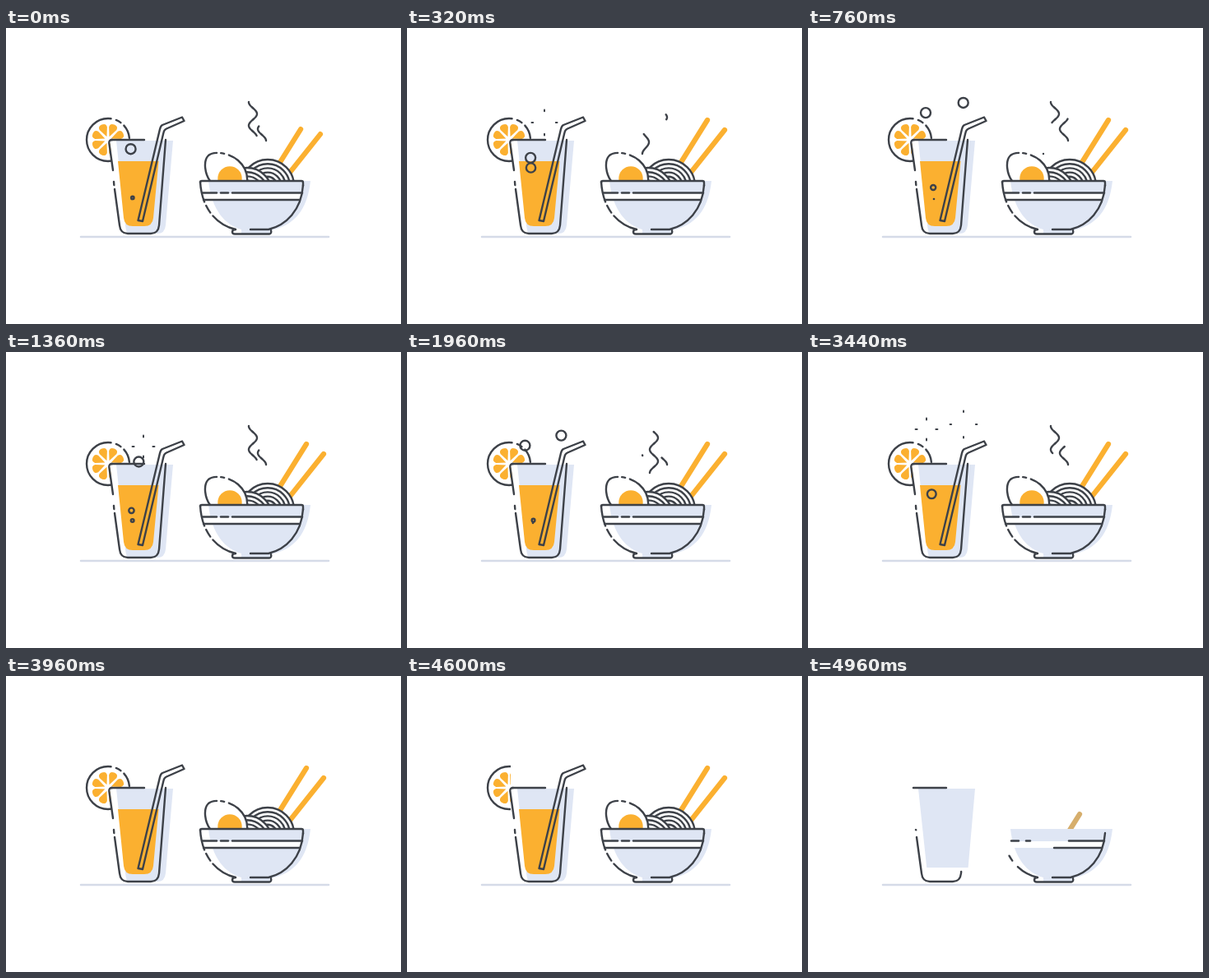
Recreate the animation shown at these times as an HTML page with a canvas. Size 480x360 px, loop 5000 ms.

```html
<!DOCTYPE html>
<html>
<head>
<meta charset="utf-8">
<style>
html, body { margin: 0; width: 100%; height: 100%; overflow: hidden; background: #fff; }
canvas { display: block; }
</style>
</head>
<body>
<canvas id="stage" width="480" height="360"></canvas>
<script>
const c = document.getElementById('stage').getContext('2d');
const INK = '#3d4148', ORANGE = '#fbb030', BLUE = '#dfe6f4', WHITE = '#fff';
const LOOP = 5000, STEP = 40, OUTRO = 4600;
const STEAM = { period: 680, rise: 285, lag: 250, wave: 14.2 };
const FIZZ = { period: 1270, speed: .152, x: 154, y: 208 };

const clamp = v => Math.max(0, Math.min(1, v));
const mix = (a, b, k) => a + (b - a) * k;
const smooth = v => { const k = clamp(v); return k * k * (3 - 2 * k); };

const path = d => new Path2D(d);
function fill(p, color) { c.fillStyle = color; c.fill(p); }
function stroke(p, width = 2.4, color = INK) {
  c.lineWidth = width; c.strokeStyle = color; c.stroke(p);
}
// Stroke only the stretch of a path between two lengths
function trim(p, from, to) {
  if (to <= from) return;
  c.setLineDash([to - from, 1e4]);
  c.lineDashOffset = -from;
  stroke(p);
  c.setLineDash([]);
}
function line(x1, y1, x2, y2, width, color) {
  stroke(path(`M${x1} ${y1}L${x2} ${y2}`), width, color);
}
function arc(x, y, r, from = 0, to = 2 * Math.PI) {
  const p = new Path2D();
  p.arc(x, y, r, from, to);
  return p;
}
function clipped(x, y, w, h, draw) {
  if (w <= 0 || h <= 0) return;
  c.save();
  c.beginPath(); c.rect(x, y, w, h); c.clip();
  draw();
  c.restore();
}

const glass = path('M126 136H194L186 240Q185 250 176 250H148Q139 250 138 240Z');
const glassShade = path('M134 137H203L194 240Q193 250 184 250H148Q146 248 145 240Z');
const juice = path('M136 162H185.5L179 231Q178 241 168 241H154Q144 241 143 231Z');
const glassCorner = path('M129 136Q125 136 125.3 140L130 173');
const glassBody = path('M132 196L138 240Q139 250 148 250H176Q185 250 186 240L194 136');
const straw = path('M160.5 234L187 123Q188 119 190 118L214 108.5L216.5 113L195 122.5Q192 124 191.5 127L166 235Z');
const wedge = path('M0 -4L-5 -15Q-5.5 -20 0 -20Q5.5 -20 5 -15Z');
const egg = path('M248 186C242 178 239 162 246 155C253 149 272 152 282 161C290 168 294 176 293 187');
const bowl = path('M236 186H361C360 222 340 240 319 245H279C258 240 238 222 236 186Z');
const bowlShade = path('M246 186H370C366 222 350 240 322 246V250H286V245C267 240 250 222 246 186Z');
const bowlLeft = path('M236 187C238 222 258 240 279 245');
const bowlRight = path('M361 191C359 222 340 240 319 245H297');
const bowlBase = path('M279 245Q275 245 275 248Q275 250.5 278 250.5H320Q323 250 322 246');
const bowlRim = path('M361 192V188Q361 186 359 186H238Q236 186 236 188');

function drawSlice(t) {
  const right = mix(152, 126, Math.max(0, (t - 4520) / 80));
  clipped(90, 100, right - 90, 70, () => {
    fill(arc(124, 136, 26), WHITE);
    for (let i = 0; i < 8; i++) {
      c.save();
      c.translate(124, 136);
      c.rotate((i + .5) * Math.PI / 4);
      fill(wedge, ORANGE);
      c.restore();
    }
    stroke(arc(124, 136, 26, 0, 4.85));
    stroke(arc(124, 136, 26, 5.1, 5.35));
    stroke(arc(124, 136, 26, 5.55, 6.2));
  });
}

function drawBurst(x, y, age) {
  const r = 6 + age * .08, h = 1.5 - age / 160;
  for (let i = 0; i < 4; i++) {
    const dx = Math.cos(i * Math.PI / 2), dy = Math.sin(i * Math.PI / 2);
    line(x + dx * (r - h), y + dy * (r - h), x + dx * (r + h), y + dy * (r + h), 2);
  }
}

// A speck appears, swells while rising, turns towards (popX, popY) and bursts
function drawBubble(age, popX, popY) {
  const life = (FIZZ.y - popY) / FIZZ.speed, p = age / life;
  if (age < -200 || age > life + 140) return;
  if (age > life) return drawBurst(popX, popY, age - life);
  if (age < 0) return fill(arc(FIZZ.x - 1, FIZZ.y, 1.3), INK);
  const x = mix(FIZZ.x, popX, smooth((p - .6) / .3)) - 4 * Math.sin(Math.PI * p);
  stroke(arc(x, FIZZ.y - age * FIZZ.speed, Math.min(6, 1.5 + age / 60)));
}

function drawBubbles(t) {
  for (let k = 0; k < 3; k++) {
    const age = t - k * FIZZ.period;
    drawBubble(age - 70, 144, 94);
    drawBubble(age + 10, 189, 88);
    drawBubble(age - 668, 167, 115);
    drawBubble(age + 400, 167, 115);
  }
}

function drawDrink(t, q) {
  drawSlice(t);
  fill(glass, WHITE);
  clipped(120, 130, 90, mix(121, 103, q), () => fill(glassShade, BLUE));
  const level = mix(162, 241, clamp(q / .9));
  clipped(120, level, 80, 242 - level, () => fill(juice, ORANGE));
  trim(glassCorner, 0, 40 * (1 - q));
  line(131, 187, 131.3, mix(191, 187.2, q));
  trim(glassBody, 0, mix(214, 106, q));
  line(128, 136, 168, 136);
  drawBubbles(t);
  const top = mix(100, 240, clamp(q / .9));
  clipped(150, top, 75, 240 - top, () => stroke(straw));
}

// Part of a vertical wave that grows upwards, then leaves through its top
function drawPlume(age, x, bottom, height, sway) {
  const tip = clamp(age / STEAM.rise), tail = clamp((age - STEAM.lag) / STEAM.rise);
  if (tip <= tail) return;
  const p = new Path2D();
  for (let d = tail * height; d <= tip * height; d += .5)
    p.lineTo(x + sway * Math.cos(Math.PI * d / STEAM.wave), bottom - d);
  stroke(p);
}

function drawSteam(t) {
  for (let k = -2; k < 5; k++) {
    const age = t - k * STEAM.period;
    drawPlume(age - 350, 300, 147, 57, -5);
    drawPlume(age - 520, 311, 137, 32, 5);
    drawPlume(age - 75, 290, 153, 28, -4);
  }
}

function drawStick(x, y, dx, dy, lift, color) {
  x += dx * lift;
  y -= dy * lift;
  line(x, y, x - dx * 85, y + dy * 85, 6.2, color);
}

function drawSticks(t) {
  const settle = 1 - clamp(t / 200), p = clamp((t - OUTRO) / 360);
  const lift = -13 * settle ** 2 - 66 * (3.5 * p ** 3 - 2.5 * p ** 2);
  const color = p > .85 ? '#d6ae6c' : ORANGE;
  drawStick(365, 112, .53, .85, lift, color);
  drawStick(386, 124, .62, .78, lift * (p ? 1.3 : .5), color);
}

function noodles(x, y, r, rings) {
  fill(arc(x, y, r), WHITE);
  for (let i = 0; i < rings; i++) stroke(arc(x, y, r - i * 5.2));
}

function drawFood(t, q) {
  clipped(220, 60, 200, 126, () => {
    drawSticks(t);
    c.translate(0, 50 * clamp(q / .85));
    noodles(318, 192, 32, 5);
    noodles(293, 200, 30, 4);
    fill(egg, WHITE);
    fill(arc(272, 183, 14.7), ORANGE);
    trim(egg, 0, 44);
    trim(egg, 49, 53);
    trim(egg, 59, 110);
  });
}

function drawBowl(q) {
  fill(bowl, WHITE);
  fill(bowlShade, BLUE);
  fill(path('M238 201H360L357 209H240Z'), WHITE);
  trim(bowlLeft, 25 * q, 25);
  trim(bowlLeft, mix(30, 33, q), 40);
  trim(bowlLeft, mix(45, 50, q), 80);
  stroke(bowlRight);
  stroke(bowlBase);
  line(mix(239, 247, q), 200.5, 256, 200.5);
  line(mix(261, 265, q), 200.5, 270, 200.5);
  line(mix(275, 317, q), 200.5, 360, 200.5);
  line(mix(240, 299, q), 209, 357, 209);
  trim(bowlRim, 0, 135 * (1 - q));
}

function draw(t) {
  const q = clamp((t - OUTRO) / 360) ** 1.5;
  c.fillStyle = WHITE;
  c.fillRect(0, 0, 480, 360);
  c.lineCap = c.lineJoin = 'round';
  line(91, 254, 392, 254, 2.5, '#d5dbe8');
  drawDrink(t, q);
  drawSteam(t);
  drawFood(t, q);
  drawBowl(q);
}

function tick() {
  draw(Math.floor(performance.now() % LOOP / STEP) * STEP);
  requestAnimationFrame(tick);
}
tick();
</script>
</body>
</html>
```
